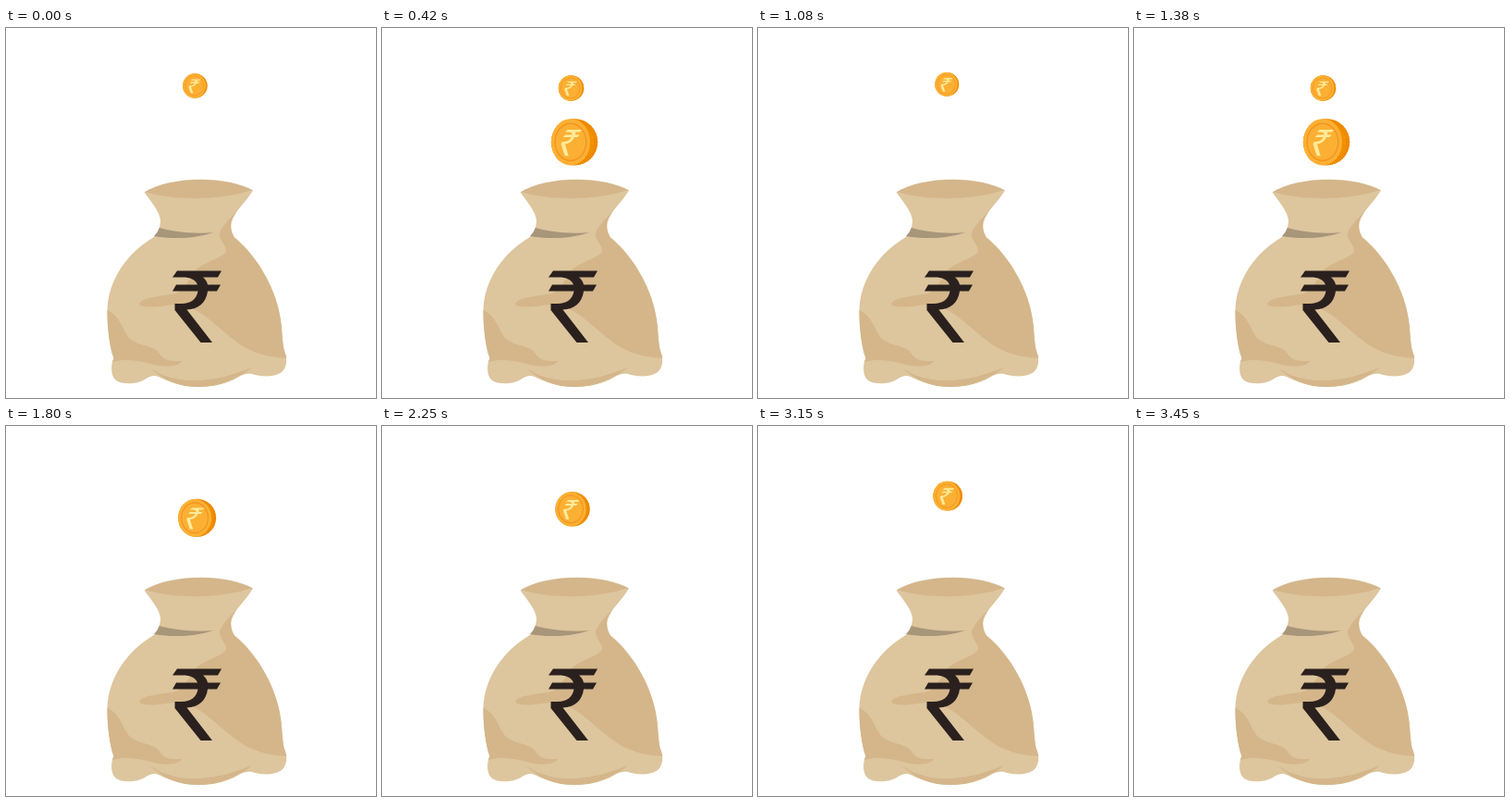
Recreate the animation shown at these times as an HTML page. Size 400 by 400 pixels, loop 3480 ms.

```html
<!DOCTYPE html>
<html lang="en">
<head>
<meta charset="utf-8">
<title>Coins falling into a money bag</title>
<style>
  html, body { margin: 0; height: 100%; overflow: hidden; background: #fff; }
  svg { display: block; width: 100%; height: 100%; }
</style>
</head>
<body>
<svg viewBox="0 0 400 400">
  <defs>
    <path id="rupee" d="M185 262.5H233L229 269.5H213C216 272 217.500 275 218 277.5H232L228 284.5H218C216.500 297 208 304 195.5 304.5L223 340H210.5L182.5 305V298H190C200 298 206 293 207.5 284.5H180L184 277.5H207C205 272 199 269.5 191 269.5H180Z"/>
    <path id="bag" d="M149.500 177.500Q208 192 267 175.500C260 188 247 198 243.500 210C242.500 216 244 222 247 226.500C273 248 294 285 297.500 320C299 335 299 345 302 352C304 358 304 367 298 372C290 378 275 377 266 374C260 373 255 375 250 378C240 384 225 388 208 388C195 388 180 385 165 377C160 375 156 376 150 380C142 385 126 386 119 381C113 376 113 364 116.500 357C112 345 109.500 325 109.500 306C110 272 132 242 160 226C164 221 167 215 167 208C166 198 157 188 149.500 177.500Z"/>
    <clipPath id="inBag"><use href="#bag"/></clipPath>
    <g id="face">
      <circle r="1" fill="#fbb034"/>
      <circle r=".8" fill="none" stroke="#f5921e" stroke-width=".06"/>
      <use href="#rupee" fill="#ffeb9a" transform="scale(.0155 .0145) translate(-6.500 2) skewX(-24) translate(-206 -301)"/>
    </g>
  </defs>

  <path fill="#d4b68a" d="M149.500 177.500C178 159.500 239 159.500 267 175.500Q208 195 149.500 177.500Z"/>
  <g id="coins"></g>

  <use href="#bag" fill="#ddc59d"/>
  <g clip-path="url(#inBag)" fill="#d4b68a">
    <path d="M249 199C240 208 231 216 231 224C232 231 238 234 238 242C232 250 213 253 204 263C196 274 192 286 180 288C165 290 148 291 144 298C146 304 165 301 182 299C199 299 212 308 228 322C248 339 264 355 303 357L310 240Z"/>
    <path d="M105 303C124 309 125 326 134 336C145 345 159 342 166 352C171 361 180 360 190 360C188 366 172 367 160 364C145 360 132 357 115 361L105 350Z"/>
    <path d="M154 366C168 377 187 382 208 381C232 380 250 373 266 367C251 379 230 388 208 389C185 388 168 379 154 366Z"/>
  </g>
  <path fill="#a8967a" d="M166 216C180 220 203 223 224 221C209 227 181 229 160 225Q164 221 166 216Z"/>
  <use href="#rupee" fill="#2a201e"/>
</svg>

<script>
const STEP = 30, LOOP = 3480, SPACING = 16, COUNT = 7;
const coins = document.getElementById('coins');

// A small toss upwards, then an accelerating fall; n is the coin's age in steps.
function coin(n) {
  const fall = -1.127 * n + 0.1025 * n ** 2 + 0.0206 * n ** 3;
  const x = Math.min(210, 204.4 + 0.06 * fall);
  const r = Math.min(13.25 + 0.197 * fall, 25.2 + 0.055 * (fall - 61), 27);
  const edge = Math.min(0.17, 0.06 + 0.0017 * fall);
  return `<g transform="translate(${x} ${62.5 + fall}) scale(${r})">
    <circle r="1" fill="#f29100"/>
    <circle r=".92" fill="none" stroke="#e27d00" stroke-width=".16" stroke-dasharray=".03 .06"/>
    <use href="#face" transform="translate(${-edge}) scale(${1 - edge} 1)"/>
  </g>`;
}

function draw(now) {
  const step = Math.floor(now % LOOP / STEP);
  let shapes = '';
  for (let k = 0; k < COUNT; k++) {
    const n = step - k * SPACING;
    if (n >= -2 && n <= 18) shapes += coin(n);
  }
  coins.innerHTML = shapes;
  requestAnimationFrame(draw);
}
draw(performance.now());
</script>
</body>
</html>
```
